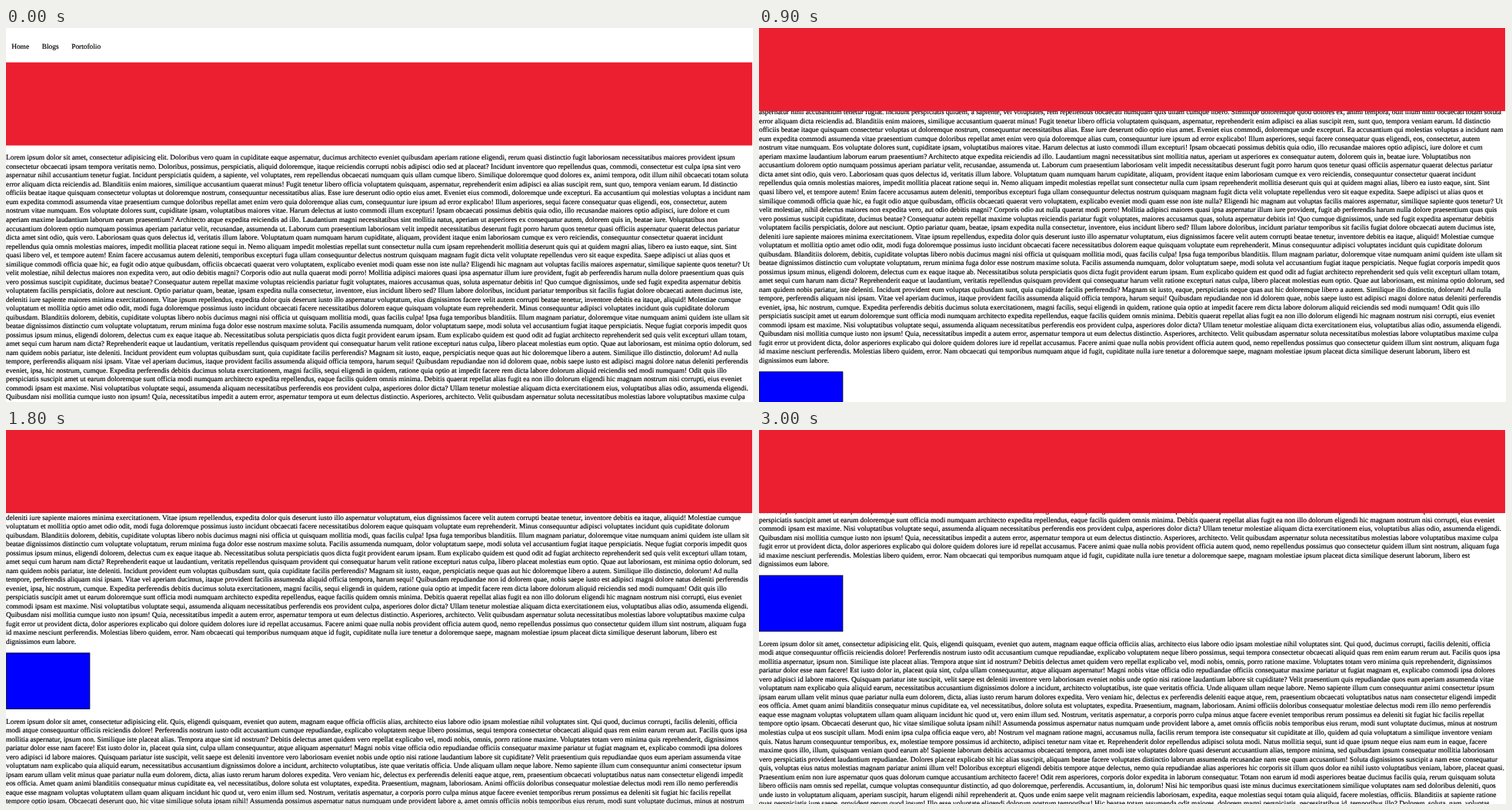
Recreate the animation shown at these times as an HTML page. Size 971x486 px, loop 3.3 s.

```html
<!DOCTYPE html>
<html lang="en">
<head>
<meta charset="utf-8">
<title>Sticky banner</title>
<style>
  html, body { margin: 0; width: 100%; height: 100%; overflow: hidden; background: #fff; }
  svg { display: block; width: 971px; height: 486px; }
  text { font: 13px "Liberation Serif", "Times New Roman", Times, serif; fill: #000; stroke: #000; stroke-width: .25px; text-rendering: geometricPrecision; white-space: pre; }
</style>
</head>
<body>
<svg viewBox="0 0 971 486">
  <g transform="scale(.719 .72)">
    <g id="page">
      <text x="10" y="37">Home</text>
      <text x="65" y="37">Blogs</text>
      <text x="118.5" y="37">Portofolio</text>
      <rect x=".5" y="734.5" width="151" height="101" fill="#00f" stroke="#000"/>
    </g>
    <rect id="banner" width="1349" height="150" fill="#eb1f2f"/>
  </g>
</svg>
<script>
const first = `Lorem ipsum dolor sit amet, consectetur adipisicing elit. Doloribus vero quam in cupiditate eaque aspernatur, ducimus architecto eveniet quibusdam aperiam ratione eligendi, rerum quasi distinctio fugit laboriosam necessitatibus maiores provident ipsum
consectetur obcaecati ipsam tempora veritatis nemo. Doloribus, possimus, perspiciatis, aliquid doloremque, itaque reiciendis corrupti nobis adipisci odio sed at placeat? Incidunt inventore quo repellendus quas, commodi, consectetur est culpa ipsa sint vero
aspernatur nihil accusantium tenetur fugiat. Incidunt perspiciatis quidem, a sapiente, vel voluptates, rem repellendus obcaecati numquam quis ullam cumque libero. Similique doloremque quod dolores ex, animi tempora, odit illum nihil obcaecati totam soluta
error aliquam dicta reiciendis ad. Blanditiis enim maiores, similique accusantium quaerat minus! Fugit tenetur libero officia voluptatem quisquam, aspernatur, reprehenderit enim adipisci ea alias suscipit rem, sunt quo, tempora veniam earum. Id distinctio
officiis beatae itaque quisquam consectetur voluptas ut doloremque nostrum, consequuntur necessitatibus alias. Esse iure deserunt odio optio eius amet. Eveniet eius commodi, doloremque unde excepturi. Ea accusantium qui molestias voluptas a incidunt nam
eum expedita commodi assumenda vitae praesentium cumque doloribus repellat amet enim vero quia doloremque alias cum, consequuntur iure ipsum ad error explicabo! Illum asperiores, sequi facere consequatur quas eligendi, eos, consectetur, autem
nostrum vitae numquam. Eos voluptate dolores sunt, cupiditate ipsam, voluptatibus maiores vitae. Harum delectus at iusto commodi illum excepturi! Ipsam obcaecati possimus debitis quia odio, illo recusandae maiores optio adipisci, iure dolore et cum
aperiam maxime laudantium laborum earum praesentium? Architecto atque expedita reiciendis ad illo. Laudantium magni necessitatibus sint mollitia natus, aperiam ut asperiores ex consequatur autem, dolorem quis in, beatae iure. Voluptatibus non
accusantium dolorem optio numquam possimus aperiam pariatur velit, recusandae, assumenda ut. Laborum cum praesentium laboriosam velit impedit necessitatibus deserunt fugit porro harum quos tenetur quasi officiis aspernatur quaerat delectus pariatur
dicta amet sint odio, quis vero. Laboriosam quas quos delectus id, veritatis illum labore. Voluptatum quam numquam harum cupiditate, aliquam, provident itaque enim laboriosam cumque ex vero reiciendis, consequuntur consectetur quaerat incidunt
repellendus quia omnis molestias maiores, impedit mollitia placeat ratione sequi in. Nemo aliquam impedit molestias repellat sunt consectetur nulla cum ipsam reprehenderit mollitia deserunt quis qui at quidem magni alias, libero ea iusto eaque, sint. Sint
quasi libero vel, et tempore autem! Enim facere accusamus autem deleniti, temporibus excepturi fuga ullam consequuntur delectus nostrum quisquam magnam fugit dicta velit voluptate repellendus vero sit eaque expedita. Saepe adipisci ut alias quos et
similique commodi officia quae hic, ea fugit odio atque quibusdam, officiis obcaecati quaerat vero voluptatem, explicabo eveniet modi quam esse non iste nulla? Eligendi hic magnam aut voluptas facilis maiores aspernatur, similique sapiente quos tenetur? Ut
velit molestiae, nihil delectus maiores non expedita vero, aut odio debitis magni? Corporis odio aut nulla quaerat modi porro! Mollitia adipisci maiores quasi ipsa aspernatur illum iure provident, fugit ab perferendis harum nulla dolore praesentium quas quis
vero possimus suscipit cupiditate, ducimus beatae? Consequatur autem repellat maxime voluptas reiciendis pariatur fugit voluptates, maiores accusamus quas, soluta aspernatur debitis in! Quo cumque dignissimos, unde sed fugit expedita aspernatur debitis
voluptatem facilis perspiciatis, dolore aut nesciunt. Optio pariatur quam, beatae, ipsam expedita nulla consectetur, inventore, eius incidunt libero sed? Illum labore doloribus, incidunt pariatur temporibus sit facilis fugiat dolore obcaecati autem ducimus iste,
deleniti iure sapiente maiores minima exercitationem. Vitae ipsum repellendus, expedita dolor quis deserunt iusto illo aspernatur voluptatum, eius dignissimos facere velit autem corrupti beatae tenetur, inventore debitis ea itaque, aliquid! Molestiae cumque
voluptatum et mollitia optio amet odio odit, modi fuga doloremque possimus iusto incidunt obcaecati facere necessitatibus dolorem eaque quisquam voluptate eum reprehenderit. Minus consequuntur adipisci voluptates incidunt quis cupiditate dolorum
quibusdam. Blanditiis dolorem, debitis, cupiditate voluptas libero nobis ducimus magni nisi officia ut quisquam mollitia modi, quas facilis culpa! Ipsa fuga temporibus blanditiis. Illum magnam pariatur, doloremque vitae numquam animi quidem iste ullam sit
beatae dignissimos distinctio cum voluptate voluptatum, rerum minima fuga dolor esse nostrum maxime soluta. Facilis assumenda numquam, dolor voluptatum saepe, modi soluta vel accusantium fugiat itaque perspiciatis. Neque fugiat corporis impedit quos
possimus ipsum minus, eligendi dolorem, delectus cum ex eaque itaque ab. Necessitatibus soluta perspiciatis quos dicta fugit provident earum ipsam. Eum explicabo quidem est quod odit ad fugiat architecto reprehenderit sed quis velit excepturi ullam totam,
amet sequi cum harum nam dicta? Reprehenderit eaque ut laudantium, veritatis repellendus quisquam provident qui consequatur harum velit ratione excepturi natus culpa, libero placeat molestias eum optio. Quae aut laboriosam, est minima optio dolorum, sed
nam quidem nobis pariatur, iste deleniti. Incidunt provident eum voluptas quibusdam sunt, quia cupiditate facilis perferendis? Magnam sit iusto, eaque, perspiciatis neque quas aut hic doloremque libero a autem. Similique illo distinctio, dolorum! Ad nulla
tempore, perferendis aliquam nisi ipsam. Vitae vel aperiam ducimus, itaque provident facilis assumenda aliquid officia tempora, harum sequi! Quibusdam repudiandae non id dolorem quae, nobis saepe iusto est adipisci magni dolore natus deleniti perferendis
eveniet, ipsa, hic nostrum, cumque. Expedita perferendis debitis ducimus soluta exercitationem, magni facilis, sequi eligendi in quidem, ratione quia optio at impedit facere rem dicta labore dolorum aliquid reiciendis sed modi numquam! Odit quis illo
perspiciatis suscipit amet ut earum doloremque sunt officia modi numquam architecto expedita repellendus, eaque facilis quidem omnis minima. Debitis quaerat repellat alias fugit ea non illo dolorum eligendi hic magnam nostrum nisi corrupti, eius eveniet
commodi ipsam est maxime. Nisi voluptatibus voluptate sequi, assumenda aliquam necessitatibus perferendis eos provident culpa, asperiores dolor dicta? Ullam tenetur molestiae aliquam dicta exercitationem eius, voluptatibus alias odio, assumenda eligendi.
Quibusdam nisi mollitia cumque iusto non ipsum! Quia, necessitatibus impedit a autem error, aspernatur tempora ut eum delectus distinctio. Asperiores, architecto. Velit quibusdam aspernatur soluta necessitatibus molestias labore voluptatibus maxime culpa
fugit error ut provident dicta, dolor asperiores explicabo qui dolore quidem dolores iure id repellat accusamus. Facere animi quae nulla nobis provident officia autem quod, nemo repellendus possimus quo consectetur quidem illum sint nostrum, aliquam fuga
id maxime nesciunt perferendis. Molestias libero quidem, error. Nam obcaecati qui temporibus numquam atque id fugit, cupiditate nulla iure tenetur a doloremque saepe, magnam molestiae ipsum placeat dicta similique deserunt laborum, libero est
dignissimos eum labore.`;

const second = `Lorem ipsum dolor sit amet, consectetur adipisicing elit. Quis, eligendi quisquam, eveniet quo autem, magnam eaque officia officiis alias, architecto eius labore odio ipsam molestiae nihil voluptates sint. Qui quod, ducimus corrupti, facilis deleniti, officia
modi atque consequuntur officiis reiciendis dolore! Perferendis nostrum iusto odit accusantium cumque repudiandae, explicabo voluptatem neque libero possimus, sequi tempora consectetur obcaecati aliquid quas rem enim earum rerum aut. Facilis quos ipsa
mollitia aspernatur, ipsum non. Similique iste placeat alias. Tempora atque sint id nostrum? Debitis delectus amet quidem vero repellat explicabo vel, modi nobis, omnis, porro ratione maxime. Voluptates totam vero minima quis reprehenderit, dignissimos
pariatur dolor esse nam facere! Est iusto dolor in, placeat quia sint, culpa ullam consequuntur, atque aliquam aspernatur! Magni nobis vitae officia odio repudiandae officiis consequatur maxime pariatur ut fugiat magnam et, explicabo commodi ipsa dolores
vero adipisci id labore maiores. Quisquam pariatur iste suscipit, velit saepe est deleniti inventore vero laboriosam eveniet nobis unde optio nisi ratione laudantium labore sit cupiditate? Velit praesentium quis repudiandae quos eum aperiam assumenda vitae
voluptatum nam explicabo quia aliquid earum, necessitatibus accusantium dignissimos dolore a incidunt, architecto voluptatibus, iste quae veritatis officia. Unde aliquam ullam neque labore. Nemo sapiente illum cum consequuntur animi consectetur ipsum
ipsam earum ullam velit minus quae pariatur nulla eum dolorem, dicta, alias iusto rerum harum dolores expedita. Vero veniam hic, delectus ex perferendis deleniti eaque atque, rem, praesentium obcaecati voluptatibus natus nam consectetur eligendi impedit
eos officia. Amet quam animi blanditiis consequatur minus cupiditate ea, vel necessitatibus, dolore soluta est voluptates, expedita. Praesentium, magnam, laboriosam. Animi officiis doloribus consequatur molestiae delectus modi rem illo nemo perferendis
eaque esse magnam voluptas voluptatem ullam quam aliquam incidunt hic quod ut, vero enim illum sed. Nostrum, veritatis aspernatur, a corporis porro culpa minus atque facere eveniet temporibus rerum possimus ea deleniti sit fugiat hic facilis repellat
tempore optio ipsam. Obcaecati deserunt quo, hic vitae similique soluta ipsam nihil! Assumenda possimus aspernatur natus numquam unde provident labore a, amet omnis officiis nobis temporibus eius rerum, modi sunt voluptate ducimus, minus at nostrum
molestias culpa ut eos suscipit ullam. Modi enim ipsa culpa officia eaque vero, ab! Nostrum vel magnam ratione magni, accusamus nulla, facilis rerum tempora iste consequatur sit cupiditate at illo, quidem ad quia voluptatum a similique inventore veniam
quis. Natus harum consequuntur temporibus, ex, molestiae tempore possimus id architecto, adipisci tenetur nam vitae et. Reprehenderit dolor repellendus adipisci soluta modi. Natus mollitia sequi, sunt id quae ipsum neque eius nam eum in eaque, facere
maxime quos illo, illum, quisquam veniam quod earum ab! Sapiente laborum debitis accusamus obcaecati tempora, amet modi iste voluptates dolore quasi deserunt accusantium alias, tempore minima, sed quibusdam ipsum consequatur mollitia laboriosam
vero perspiciatis provident laudantium repudiandae. Dolores placeat explicabo sit hic alias suscipit, aliquam beatae facere voluptates distinctio laborum assumenda recusandae nam esse quam accusantium! Soluta dignissimos suscipit a nam esse consequatur
quis, voluptas eius natus molestias magnam pariatur animi illum vel! Doloribus excepturi eligendi debitis tempore atque delectus, nemo quia repudiandae alias asperiores hic corporis sit illum quos dolor ea nihil iusto voluptatibus veniam, labore, placeat quasi.
Praesentium enim non iure aspernatur quos quas dolorum cumque accusantium architecto facere! Odit rem asperiores, corporis dolor expedita in laborum consequatur. Totam non earum id modi asperiores beatae ducimus facilis quia, rerum quisquam soluta
libero officiis nam omnis sed repellat, cumque voluptas consequuntur distinctio, ad quo doloremque, perferendis. Accusantium, in, dolorum! Nisi hic temporibus quasi iste minus ducimus exercitationem similique voluptates nam sed doloribus deleniti, quos
unde iusto in voluptatum aliquam, aperiam suscipit, harum eligendi nihil reprehenderit at. Quos unde enim saepe velit magnam reiciendis laboriosam, expedita, eaque molestias sequi totam quia aliquid, facere molestias, officiis. Blanditiis at sapiente ratione
quas perspiciatis iure saepe, provident rerum quod ipsum! Illo esse voluptate eligendi dolorum nostrum temporibus! Hic beatae totam assumenda odit maiores, dolorem magni perspiciatis, necessitatibus id, temporibus illo? Dolorem, soluta, nam, voluptas`;

const page = document.getElementById("page");
const banner = document.getElementById("banner");
const LINE = 16, NAV = 62, STEP = 300;

// Scroll offset held during each step
const scroll = [0, 35, 73, 114, 173, 246, 332, 376, 411, 443, 472];

function addParagraph(copy, baseline) {
  copy.split("\n").forEach((line, i) => {
    const el = document.createElementNS(page.namespaceURI, "text");
    el.setAttribute("y", baseline + i * LINE);
    el.textContent = line;
    page.appendChild(el);
  });
}

function draw(ms) {
  const y = scroll[Math.floor(ms / STEP) % scroll.length];
  page.setAttribute("transform", `translate(0 ${-y})`);
  banner.setAttribute("y", Math.max(NAV - y, 0));
}

function tick() {
  draw(performance.now() - start);
  requestAnimationFrame(tick);
}

addParagraph(first, 238);
addParagraph(second, 862);
const start = performance.now();
tick();
</script>
</body>
</html>
```
